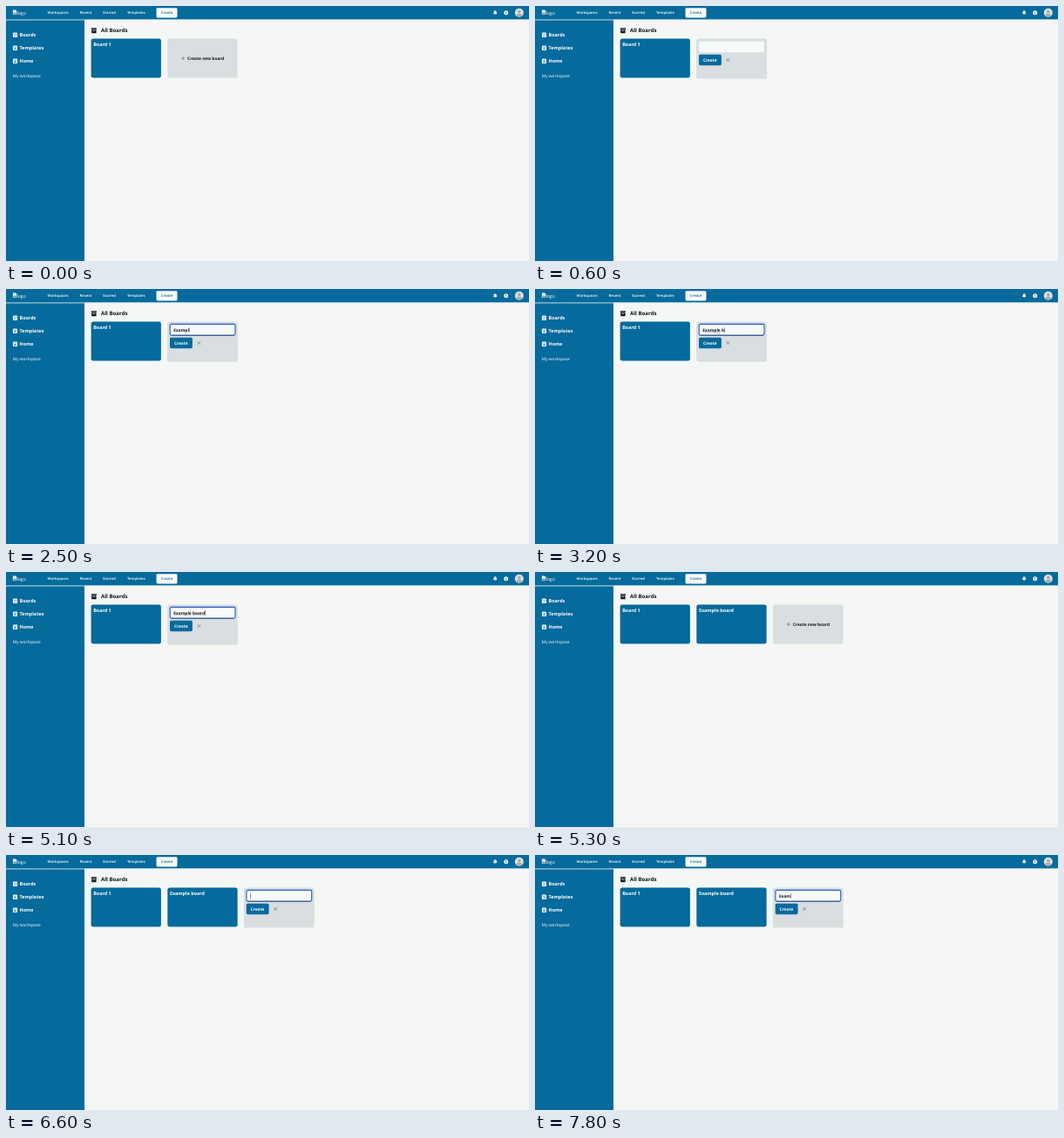
An HTML page that plays this animation: 600 by 293 pixels, repeating every 8 s.

```html
<!DOCTYPE html>
<html lang="en">
<head>
<meta charset="utf-8">
<title>All Boards</title>
<style>
  html, body { margin: 0; width: 100%; height: 100%; overflow: hidden; background: #f4f7f4; }
  svg { display: block; width: 100vw; height: 100vh; }
  text { font: 700 5.4px "Open Sans", "Noto Sans", sans-serif; text-rendering: geometricPrecision; white-space: pre; fill: #10161b; }
  .white text, text.white { fill: #fff; }
  .nav text { font-size: 4.2px; font-weight: 600; }
  .small { font-size: 4.8px; }
  .blue { fill: #056a9c; }
  .light { fill: #f8faf9; }
  .line { fill: none; stroke: #5d6468; stroke-width: .6; }
  .squiggle { stroke: #73383c; stroke-width: .6; stroke-dasharray: .8 .5; opacity: .7; }
</style>
</head>
<body>
<svg viewBox="0 0 600 293">
  <defs>
    <g id="tile">
      <rect width="5.2" height="5.3" y=".2" rx=".7" class="light"/>
      <rect x="1" y="-.4" width=".8" height="1.2" class="light"/>
      <rect x="3.4" y="-.4" width=".8" height="1.2" class="light"/>
      <rect x=".6" y="1.3" width="4" height=".5" class="blue"/>
    </g>
  </defs>

  <rect width="600" height="293" fill="#f4f7f4"/>
  <rect width="90" height="293" class="blue"/>
  <rect width="600" height="15.6" class="blue"/>
  <rect y="15.5" width="600" height=".9" fill="#dce9ee"/>

  <g class="white nav">
    <path d="M8 4.4h3l1.2 1.2v4.2h-4.2z" fill="#e4edf0" stroke="#a8b8be" stroke-width=".4"/>
    <path d="M8.4 9.2l1.4-2 1 1 .9-.8v1.8z" fill="#63906d"/>
    <text x="12.4" y="9.6" style="font-size:5.2px;font-weight:400">logo</text>
    <text x="47.5" y="9.3">Workspaces</text>
    <text x="84.6" y="9.3">Recent</text>
    <text x="111" y="9.3">Starred</text>
    <text x="139" y="9.3">Templates</text>
    <rect x="172.5" y="2.2" width="24" height="11.2" rx="1.4" class="light"/>
    <text x="177.8" y="9.3" style="fill:#056a9c">Create</text>
    <path d="M558.8 9.1q.8-.8.8-2.2a1.6 1.6 0 0 1 3.2 0q0 1.4.8 2.2zM560.5 9.5h1.4a.7.7 0 0 1-1.4 0z" class="light"/>
    <circle cx="573.7" cy="7.7" r="2.5" class="light"/>
    <path d="M573.7 6v.8M573.7 7.3v1.9" stroke="#056a9c" stroke-width=".8"/>
    <circle cx="588.8" cy="7.7" r="5" fill="#dfe1e0"/>
    <path d="M585.5 11.2q0-2.6 3.3-2.6t3.3 2.6q-3.3 2.3-6.6 0z" fill="#a9acab"/>
    <circle cx="588.8" cy="6.4" r="1.8" fill="#a9acab"/>
  </g>

  <g class="white">
    <use href="#tile" x="7.9" y="30.6"/>
    <path d="M9.2 34.2l1 .9 1.8-1.9" fill="none" stroke="#056a9c" stroke-width=".6"/>
    <text x="15.6" y="35.3">Boards</text>
    <use href="#tile" x="7.9" y="45.5"/>
    <path d="M10.5 47.8v2.4M9.3 49h2.4" stroke="#056a9c" stroke-width=".6"/>
    <text x="15.6" y="50.2">Templates</text>
    <use href="#tile" x="7.9" y="60.5"/>
    <path d="M9.4 63.5h2.2v1.4h-2.2z" class="blue"/>
    <text x="15.6" y="65.2">Home</text>
    <text x="7.8" y="81.7" class="small" style="font-weight:400">My workspace</text>
  </g>

  <path d="M97.8 25.2h6.2v1.6h-6.2zM98.2 27.2h5.4v4h-5.4z" fill="#151b20"/>
  <rect x="99.8" y="28" width="2.2" height=".6" fill="#f4f7f4"/>
  <text x="109" y="30.2" style="font-size:6.1px">All Boards</text>

  <g transform="translate(97.6 37.6)">
    <rect width="80.3" height="45" rx="2.5" class="blue"/>
    <text x="2.6" y="8.7" class="white">Board 1</text>
  </g>
  <g id="newBoard" transform="translate(185.3 37.6)">
    <rect width="80.3" height="45" rx="2.5" class="blue"/>
    <text x="2.6" y="8.7" class="white">Example board</text>
  </g>

  <g id="creator">
    <rect id="shadow" x="-.1" y=".4" width="80.6" height="45.6" rx="2.7" fill="#cbd1d3" opacity=".7"/>
    <rect width="80.3" height="45" rx="2.5" fill="#d9dee0"/>
    <g id="prompt">
      <path d="M15.8 22.5h4M17.8 20.5v4" class="line"/>
      <text x="22.8" y="24.4" class="small">Create new board</text>
    </g>
    <g id="form">
      <rect x="2.9" y="2.8" width="74.8" height="12.8" rx="1.6" class="light"/>
      <g id="focus">
        <rect x="2.9" y="2.8" width="74.8" height="12.8" rx="1.6" fill="none" stroke="#245bc4" stroke-width="1.1"/>
        <path d="M4.2 15.6h72.2" stroke="#253f68" stroke-width=".7"/>
      </g>
      <text id="entry" x="7" y="11.1" class="small"></text>
      <path id="firstMark" class="squiggle"/>
      <path id="secondMark" class="squiggle"/>
      <rect id="caret" y="6.6" width=".5" height="5.6" fill="#20262a"/>
      <rect x="2.7" y="18.1" width="25.9" height="12.5" rx="1.6" class="blue"/>
      <text x="7.6" y="26.2" class="small white">Create</text>
      <path d="M34.3 22.6l3.6 3.6M37.9 22.6l-3.6 3.6" class="line"/>
    </g>
  </g>
</svg>
<script>
  const LOOP = 8000, CREATED = 5300, CARD_X = 185.3, CARD_STEP = 87.7, TEXT_X = 7;
  const phrase = "Example board";
  const rounds = [
    { open: 300, focus: 900, keys: [1600, 1900, 2000, 2200, 2300, 2500, 2600, 2700, 3200, 3300, 3400, 3600, 3900] },
    { open: 6100, focus: 6600, keys: [7000, 7400, 7600, 7800] },
  ];
  const el = id => document.getElementById(id);
  const show = (id, on) => el(id).setAttribute("visibility", on ? "inherit" : "hidden");
  const entry = el("entry");
  const widthOf = count => count ? entry.getSubStringLength(0, count) : 0;

  function underline(id, from, to, on) {
    show(id, on);
    if (on) el(id).setAttribute("d", `M${TEXT_X + widthOf(from)} 12.2H${TEXT_X + widthOf(to)}`);
  }

  function draw(t) {
    const created = t >= CREATED;
    const round = rounds[+created];
    const typed = round.keys.filter(key => t >= key).length;
    const isOpen = t >= round.open;

    show("newBoard", created);
    el("creator").setAttribute("transform", `translate(${CARD_X + CARD_STEP * created} 37.6)`);
    show("shadow", isOpen);
    show("prompt", !isOpen);
    show("form", isOpen);
    show("focus", isOpen && t >= round.focus);

    entry.textContent = phrase.slice(0, typed);
    const blinkedOff = t >= 4500 && t < 4900;
    show("caret", isOpen && t >= round.focus && !blinkedOff);
    el("caret").setAttribute("x", TEXT_X + widthOf(typed));

    underline("firstMark", 0, 7, !created && t >= 2900);
    underline("secondMark", 8, 13, !created && t >= 4900);
  }

  function tick() {
    draw(performance.now() % LOOP);
    requestAnimationFrame(tick);
  }
  tick();
</script>
</body>
</html>
```
